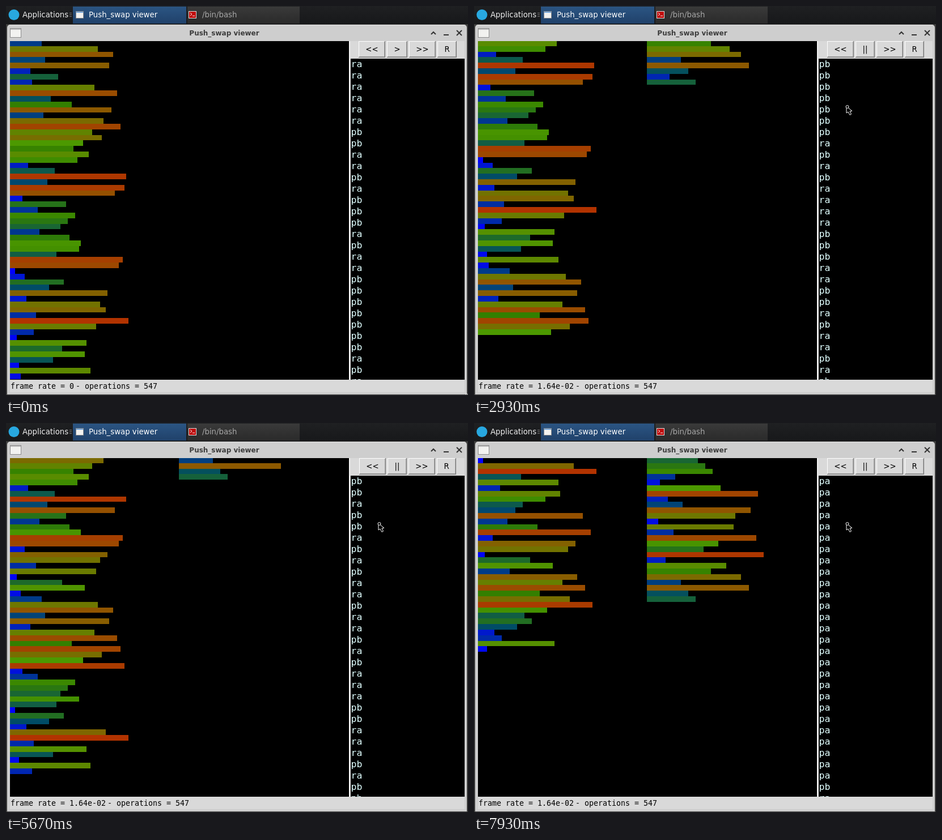
Write an HTML page with a canvas that moves like this. It is 815 px wide and 687 px high and loops after 8000 ms.

```html
<!DOCTYPE html>
<html lang="en">
<head>
<meta charset="utf-8">
<title>Push_swap viewer</title>
<style>
html, body { margin: 0; width: 100%; height: 100%; overflow: hidden; background: #1b1b1b; }
canvas { display: block; }
</style>
</head>
<body>
<canvas id="stage" width="815" height="687"></canvas>
<script>
const ctx = document.getElementById('stage').getContext('2d');
const LOOP = 8000, FRAME = 200 / 3, START_FRAME = 33;
const SANS = '"DejaVu Sans", sans-serif', MONO = '"DejaVu Sans Mono", monospace';

// The numbers being sorted, as given to the viewer.
const input = [14, 44, 52, 16, 50, 8, 23, 9, 42, 54, 19, 30, 51, 15, 47, 56, 41, 46, 36, 31, 39,
  33, 7, 21, 59, 17, 58, 53, 4, 27, 12, 32, 28, 24, 13, 29, 35, 34, 22, 57, 55, 0, 5, 26, 18, 49,
  6, 45, 48, 11, 60, 43, 10, 1, 38, 25, 37, 20, 2, 40, 3];

// Radix sort with two stacks: every operation and the state it leaves behind.
const ops = [], states = [];
(function sort() {
  const a = [...input], b = [];
  const save = () => states.push({ a: [...a], b: [...b] });
  const run = op => {
    if (op === 'ra') a.push(a.shift());
    else if (op === 'pb') b.unshift(a.shift());
    else a.unshift(b.shift());
    ops.push(op);
    save();
  };
  save();
  for (let bit = 0; bit < 3; bit++) {
    for (let i = 0; i < input.length; i++) {
      const pair = (a[0] * 2 + 1) >> bit & 3;
      run(pair === 0 || pair === 3 ? 'pb' : 'ra');
    }
    while (b.length) run('pa');
  }
})();

// Playback slows down very slightly as it goes.
const opsDone = frame => Math.floor(1.875 * frame - 0.00055 * frame * frame);

function rect(x, y, w, h, color) {
  ctx.fillStyle = color;
  ctx.fillRect(x, y, w, h);
}

function disc(x, y, r, color) {
  ctx.fillStyle = color;
  ctx.beginPath();
  ctx.arc(x, y, r, 0, 2 * Math.PI);
  ctx.fill();
}

function text(str, x, y, font, color, align = 'left') {
  ctx.font = font;
  ctx.fillStyle = color;
  ctx.textAlign = align;
  ctx.fillText(str, x, y);
}

function line(points, color, width) {
  ctx.beginPath();
  points.forEach(([x, y]) => ctx.lineTo(x, y));
  ctx.strokeStyle = color;
  ctx.lineWidth = width;
  ctx.stroke();
}

function shade(y, h, top, bottom) {
  const g = ctx.createLinearGradient(0, y, 0, y + h);
  g.addColorStop(0, top);
  g.addColorStop(1, bottom);
  return g;
}

function windowIcon(x, y, w, h, top) {
  rect(x, y, w, h, '#8c8c8c');
  rect(x + 1, y + 1, w - 2, h - 2, '#f2f2f0');
  rect(x + 1, y + 1, w - 2, 2, top);
}

function taskbar() {
  rect(0, 0, 815, 32, shade(0, 32, '#1f2022', '#17181a'));
  disc(14, 15.5, 9.5, '#28a8e0');
  text('Applications', 29, 20, '13.3px ' + SANS, '#eee');
  for (let y = 12; y <= 18; y += 3) rect(112, y, 4, 1, '#777');
  rect(118, 1, 200, 30, shade(1, 30, '#2b5583', '#20416a'));
  rect(320, 1, 198, 30, shade(1, 30, '#3a3a3a', '#2a2a2a'));
  windowIcon(123, 9, 14, 13, '#78a8dc');
  text('Push_swap viewer', 146, 20, '13.3px ' + SANS, '#fff');
  rect(322, 9, 14, 13, '#ddd');
  rect(323, 10, 12, 11, '#c00c0c');
  line([[325, 12], [328, 14.5], [325, 17]], '#fff', 1);
  rect(329, 17, 4, 1, '#fff');
  text('/bin/bash', 346, 20, '13.3px ' + SANS, '#a8a8a8');
}

function windowFrame() {
  rect(0, 32, 815, 655, '#3c3c3c');
  ctx.fillStyle = '#cecece';
  ctx.beginPath();
  ctx.roundRect(2, 33, 811, 653, [5, 5, 0, 0]);
  ctx.fill();
  rect(6, 33, 803, 1, '#e6e6e6');
  windowIcon(7, 39, 20, 17, '#b9b9b9');
  text('Push_swap viewer', 385, 52, 'bold 12px ' + SANS, '#3c3c3c', 'center');
  line([[750, 50], [754, 46], [758, 50]], '#333', 2);
  rect(772, 50, 9, 2, '#333');
  line([[795, 43], [804, 52]], '#333', 2);
  line([[804, 43], [795, 52]], '#333', 2);
  rect(7, 62, 802, 620, '#d9d9d9');
}

function button(label, x, w) {
  rect(x, 62, w, 29, '#777');
  rect(x, 62, w - 1, 28, '#fff');
  rect(x + 1, 63, w - 2, 27, '#d9d9d9');
  rect(x + 1, 89, w - 2, 1, '#a5a5a5');
  rect(x + w - 2, 63, 1, 27, '#a5a5a5');
  text(label, x + w / 2, 81, '13.3px ' + SANS, '#000', 'center');
}

// The row is centred, so it shifts when the play label changes width.
function toolbar(running) {
  const play = running ? '||' : '>';
  ctx.font = '13.3px ' + SANS;
  const labels = ['<<', play, '>>', 'R'];
  const widths = labels.map(label => Math.round(ctx.measureText(label).width + 25));
  let x = running ? 623 : 622;
  labels.forEach((label, i) => {
    button(label, x, widths[i]);
    x += widths[i] + 3;
  });
}

function barColor(v) {
  const r = Math.max(0, 4.25 * (v - 18));
  const g = Math.min(4.25 * v, 306 - 4.25 * v);
  const b = Math.max(0, 255 - 8.5 * v);
  return `rgb(${r | 0},${g | 0},${b | 0})`;
}

function clipped(x, y, w, h, paint) {
  ctx.save();
  ctx.beginPath();
  ctx.rect(x, y, w, h);
  ctx.clip();
  rect(x, y, w, h, '#000');
  paint();
  ctx.restore();
}

function stack(values, x, offset) {
  const rowTop = i => Math.round(61 + i * 598 / input.length);
  values.forEach((v, i) => {
    const right = Math.round(16 + offset + 3.325 * v);
    rect(x, rowTop(i), right - x, rowTop(i + 1) - rowTop(i), barColor(v));
  });
}

function content(done) {
  clipped(7, 62, 598, 598, () => {
    stack(states[done].a, 7, 0);
    stack(states[done].b, 305, 299);
  });
  rect(605, 62, 2, 598, '#f2f2f2');
  clipped(608, 93, 201, 567, () => {
    const first = Math.max(0, done - 1);
    ops.slice(first, first + 29).forEach((op, i) =>
      text(op, 608.5, 108 + 20 * i, '16.61px ' + MONO, '#e0ffff'));
  });
}

// Eased 0..1 progress of t between two times.
function ease(t, from, to) {
  const f = Math.max(0, Math.min(1, (t - from) / (to - from)));
  return f * f * (3 - 2 * f);
}

// In from the corner and out below, back up to the buttons, then down beside the list.
function pointerAt(t) {
  if (t < 1200) {
    const f = ease(t, 130, 1000);
    return [812 - 690 * f, 684 + 6 * f - 300 * Math.sin(Math.PI * f)];
  }
  const up = ease(t, 1200, 1460), over = ease(t, 1500, 2000), down = ease(t, 2260, 2800);
  return [10 + 654 * up + 26 * over - 33 * down, 690 - 606 * up - 6 * over + 99 * down];
}

function cursor([x, y], ring) {
  ctx.save();
  ctx.translate(x, y);
  const arrow = new Path2D('M0 0V12L3 10 6 15.5 8.5 14 6 9 10 8.5Z');
  ctx.fillStyle = '#000';
  ctx.fill(arrow);
  ctx.strokeStyle = '#fff';
  ctx.lineWidth = 1;
  ctx.stroke(arrow);
  if (ring) {
    disc(1.5, 1, 2.5, '#000');
    ctx.stroke();
  }
  ctx.restore();
}

function draw(time) {
  const frame = Math.floor((time + 5) / FRAME);
  const running = frame >= START_FRAME;
  taskbar();
  windowFrame();
  toolbar(running);
  content(running ? opsDone(frame - START_FRAME) : 0);

  const rate = 'frame rate = ' + (running ? '1.64e-02' : '0');
  text(rate, 8, 676, '13.29px ' + MONO, '#000');
  text('- operations = 547', 11 + 8 * rate.length, 676, '13.29px ' + MONO, '#000');
  cursor(pointerAt(frame * FRAME), running);
}

function tick() {
  draw(performance.now() % LOOP);
  requestAnimationFrame(tick);
}
tick();
</script>
</body>
</html>
```
